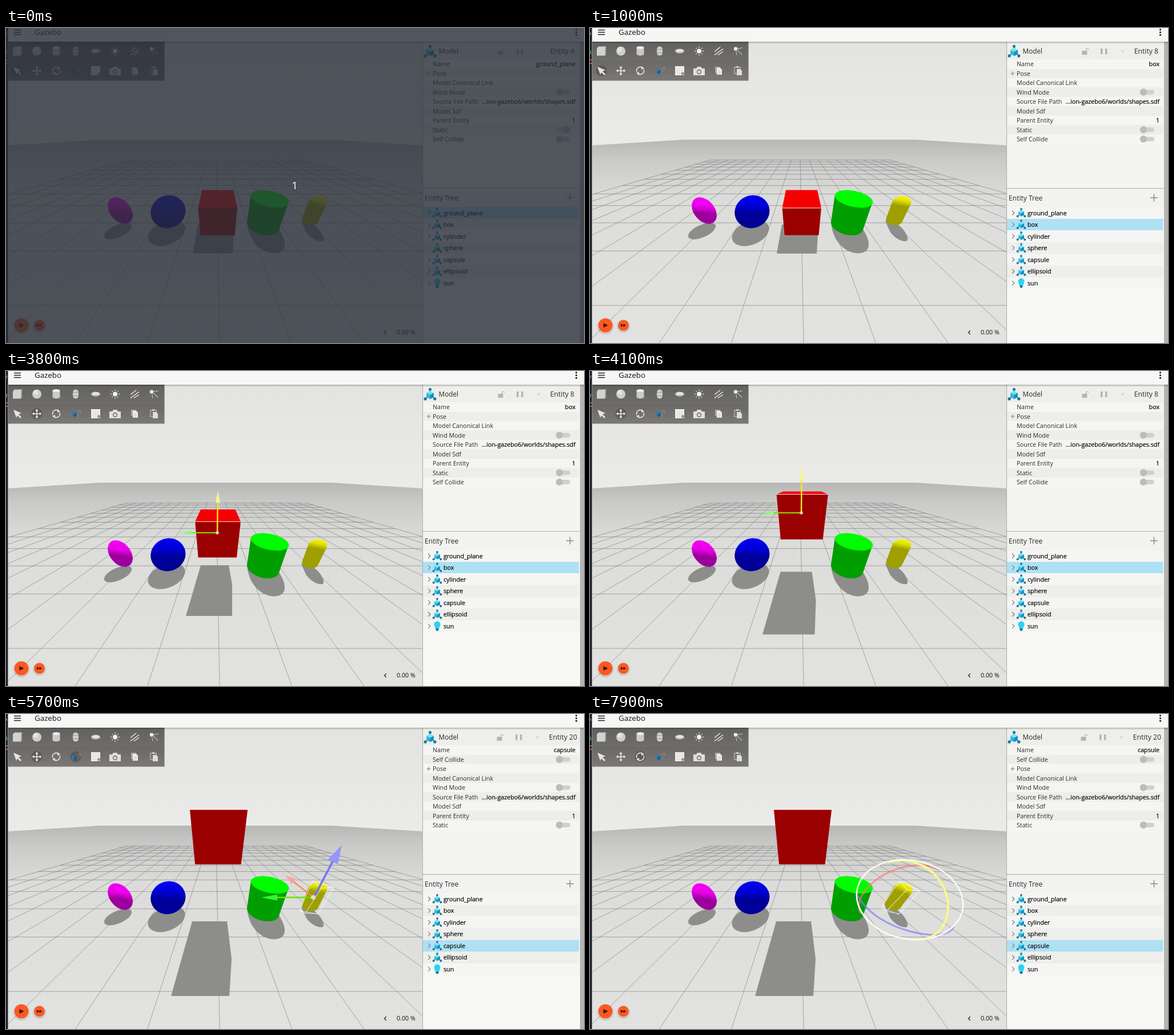
An HTML page for the animation above (8000 ms loop, 1012 by 553 pixels).

```html
<!DOCTYPE html>
<html lang="en">
<head>
<meta charset="utf-8">
<title>Simulation scene</title>
<style>
html, body { margin: 0; width: 100%; height: 100%; overflow: hidden; background: #f7f7f6; }
svg { display: block; width: 1012px; height: 553px; font-family: "Open Sans", "Noto Sans", sans-serif; }
text { fill: #111; white-space: pre; }
.label { fill: #2b2b2b; }
.value { fill: #000; stroke: #000; stroke-width: .2px; }
.shadow { fill: #8d8d8b; }
.line { fill: none; stroke-linecap: round; stroke-linejoin: round; }
</style>
</head>
<body>
<svg id="stage" viewBox="0 0 1012 553">
  <defs>
    <linearGradient id="sky" x2="0" y2="1"><stop stop-color="#e3e3e2"/><stop offset="1" stop-color="#ebebea"/></linearGradient>
    <linearGradient id="ground" gradientUnits="userSpaceOnUse" x1="0" y1="196" x2="0" y2="553">
      <stop stop-color="#b7b7b6"/><stop offset=".1" stop-color="#cacac9"/><stop offset=".28" stop-color="#dcdcda"/><stop offset="1" stop-color="#e2e2e0"/>
    </linearGradient>
    <linearGradient id="drop" x2="0" y2="1"><stop stop-opacity=".25"/><stop offset="1" stop-opacity="0"/></linearGradient>
    <linearGradient id="bar" x2="0" y2="1"><stop stop-color="#626160"/><stop offset=".48" stop-color="#6f6d6b"/><stop offset=".5" stop-color="#6b6967"/><stop offset="1" stop-color="#7b7876"/></linearGradient>
    <linearGradient id="magenta" gradientUnits="userSpaceOnUse" x1="203" y1="297" x2="197" y2="344" gradientTransform="rotate(-50 200 320.5)"><stop stop-color="#f600f6"/><stop offset=".36" stop-color="#e800e8"/><stop offset=".6" stop-color="#9c009c"/></linearGradient>
    <linearGradient id="blue" gradientUnits="userSpaceOnUse" x1="284" y1="294" x2="284" y2="351" gradientTransform="rotate(22 283.800 322.500)"><stop stop-color="#0000f2"/><stop offset=".28" stop-color="#0000dc"/><stop offset=".58" stop-color="#000098"/></linearGradient>
    <linearGradient id="yellow" gradientUnits="userSpaceOnUse" x1="545" y1="295" x2="541" y2="316"><stop stop-color="#f6f600"/><stop offset=".35" stop-color="#e2e200"/><stop offset=".8" stop-color="#9f9f00"/></linearGradient>
    <clipPath id="view"><path d="M4 24H729V553H4Z"/></clipPath>
    <clipPath id="props"><path d="M729 24H1005V281H729Z"/></clipPath>
    <g id="cube">
      <path fill="#28b9e2" d="M0-6 5.2-3V3L0 6-5.2 3V-3Z"/>
      <path fill="#7fe0f5" d="M0-6 5.2-3 0 0-5.2-3Z"/>
      <path fill="#1590bb" d="M0 0 5.2-3V3L0 6Z"/>
    </g>
    <g id="model">
      <path stroke="#37718c" stroke-width="1.2" d="M0-7V0M0 0-6.5 6M0 0 6.5 6"/>
      <use href="#cube" transform="translate(0 .8) scale(.92)"/>
      <g fill="#1679a3"><circle cy="-6.6" r="1.9"/><circle cx="-6.3" cy="6" r="2"/><circle cx="6.3" cy="6" r="2"/></g>
    </g>
  </defs>

  <g clip-path="url(#view)">
    <path fill="url(#sky)" d="M4 24H729V207H4Z"/>
    <path fill="url(#ground)" d="M4 206 165 196H570L729 206V553H4Z"/>
    <path id="grid" class="line" stroke="#777776" stroke-width=".7" opacity=".85"/>

    <ellipse class="shadow" cx="196" cy="356.5" rx="26" ry="11" transform="rotate(-24 196 356.5)"/>
    <ellipse class="shadow" cx="281" cy="360" rx="34" ry="20.5" transform="rotate(-22 281 360)"/>
    <path class="shadow" d="M422 338C423 362 432 378 448 389 462 398 486 399 488 382 489 370 481 358 470 340Z"/>
    <path class="shadow" d="M517 339C522 335 536 341 546 351 555 361 559 372 554 374 545 376 531 367 525 357Z"/>
    <path id="boxShadow" class="shadow"/>

    <ellipse cx="200" cy="320.5" rx="26.5" ry="18" fill="url(#magenta)" transform="rotate(50 200 320.5)"/>
    <ellipse cx="283.8" cy="322.5" rx="30.9" ry="28.6" fill="url(#blue)" transform="rotate(-22 283.8 322.5)"/>
    <path id="boxTop" fill="#f40000"/>
    <path id="boxFront" fill="#9b0000"/>
    <g id="boxWire" class="line" stroke="#fff"><path id="wireEdge" opacity=".8"/><path id="wireSides" opacity=".18"/></g>
    <path fill="#009e00" d="M429 292 422 340C421 352 440 364 458 364 470 364 476 360 478 354L495 305Z"/>
    <ellipse cx="462" cy="300" rx="34" ry="14" fill="#00fb00" transform="rotate(12 462 300)"/>
    <g id="capsule">
      <path fill="url(#yellow)" d="M530 303C534 295 552 293 559 299 563 302 563 306 561 311L546 341C543 347 534 347 527 345 519 342 517 338 519 333Z"/>
      <path id="capWire" class="line" stroke="#fff" opacity=".75" d="M514 345 537 293 574 304 546 351Z M524 350 552 306 537 293M552 306 574 304M524 350 514 345M524 350H546"/>
    </g>

    <g id="boxGizmo">
      <path id="axisY" class="line" stroke="#86e000" stroke-width="2"/>
      <path id="coneY"/>
      <path id="axisZ" class="line" stroke-width="2.5"/>
      <path id="coneZ"/>
      <circle id="boxDot" cx="370" r="2.8" fill="#d9d0d0"/>
    </g>

    <g id="capGizmo">
      <path class="line" stroke="#f08a60" stroke-width="2.4" d="M538 322 503 294"/>
      <path fill="#ff9c9c" fill-opacity=".85" d="M489 283 507 289 500 299Z"/>
      <path class="line" stroke="#5fe800" stroke-width="2.6" d="M538 322H474"/>
      <path fill="#38ff38" fill-opacity=".9" d="M447 322 475 317V327.5Z"/>
      <path class="line" stroke="#7474ff" stroke-width="3.6" d="M540 320 572 259"/>
      <path fill="#8f8fff" fill-opacity=".9" d="M588 230 581 263 564 255Z"/>
      <circle cx="538" cy="322" r="4" fill="#dcdccf"/>
    </g>

    <g id="rings" class="line">
      <g id="turning" stroke-width="3">
        <path stroke="#ff7777" stroke-opacity=".68" d="M473 349C464 327 484 300 515 282 547 264 594 258 621 279"/>
        <path stroke="#7c7cff" stroke-opacity=".68" d="M469 319C482 345 516 370 562 382 598 391 629 390 637 373"/>
      </g>
      <path id="ringY" stroke-width="4" d="M524 260C552 251 588 262 608 287 627 310 632 340 622 364 613 386 594 397 568 396"/>
      <ellipse cx="560" cy="326" rx="94" ry="69" stroke="#fafafa" stroke-width="2.6" transform="rotate(11 560 326)"/>
    </g>

    <path fill="url(#bar)" d="M4 24H277.5V92.5H4Z"/>
    <g id="tools"></g>
    <g opacity=".1"><circle cx="27" cy="523.5" r="14.5"/><circle cx="27" cy="523" r="13.3"/><circle cx="58.5" cy="523.5" r="11.5"/><circle cx="58.5" cy="523" r="10.4"/></g>
    <g fill="#ff571f"><circle cx="27" cy="522" r="12.3"/><circle cx="58.5" cy="522" r="9.4"/></g>
    <path fill="#2c1a12" d="M23.5 518 31.5 522 23.5 526ZM54 519.3 58.5 522 54 524.7ZM58.5 519.3 63 522 58.5 524.7Z"/>
    <path class="line" stroke="#222" stroke-width="1.3" d="M665.5 531.5 662.5 534.5 665.5 537.5"/>
    <text x="684" y="538" font-size="10.7">0.00 %</text>
  </g>

  <path fill="#f8f8f7" d="M729 24H1005V553H729Z"/>
  <g id="panel" clip-path="url(#props)"></g>
  <path stroke="#aaa" d="M729.5 24V553M730 281.5H1005"/>
  <path fill="#f2f2f0" d="M730 282H1005V314H730Z"/>
  <text x="733" y="302.5" font-size="12.1" class="label">Entity Tree</text>
  <path stroke="#8a8a8a" stroke-width="1.5" d="M981 298H994M987.5 291.5V304.5"/>
  <g id="tree"></g>

  <path fill="#b4b4b3" d="M1005 24H1012V553H1005Z"/>
  <path fill="#f6f6f5" d="M4 0H1012V24H4Z"/>
  <path fill="url(#drop)" d="M4 24H1012V28H4Z"/>
  <path fill="#1d222b" d="M0 0H3.5V553H0Z"/>
  <path fill="#4f7c72" d="M0 8H2V12H0ZM0 40H2V46H0Z"/><path fill="#b4623f" d="M0 55H3V57H0ZM0 61H3V63H0Z"/>
  <path stroke="#222" stroke-width="1.6" d="M14 3.5H26M14 7.5H26M14 11.5H26"/>
  <text x="50" y="11.8" font-size="13.3">Gazebo</text>
  <g fill="#222"><circle cx="998.5" cy="2.8" r="1.6"/><circle cx="998.5" cy="7.5" r="1.6"/><circle cx="998.5" cy="12.2" r="1.6"/></g>

  <g id="dim">
    <path fill="rgb(40,46,55)" fill-opacity=".8" d="M0 0H1012V553H0Z"/>
    <text x="505.5" y="283" font-size="18.5" text-anchor="middle" style="fill:#fff">1</text>
  </g>
</svg>
<script>
const $ = id => document.getElementById(id);
const draw = (id, d) => $(id).setAttribute("d", d);
const show = (id, on) => { $(id).style.display = on ? "" : "none"; };
const LOOP = 8000;

// Ground grid in perspective: depth is measured as offset below the horizon.
function gridPath() {
  const HORIZON = 186, CELL = .3445;
  const offset = n => 1 / (.003322 + .001544 * n);
  const x = (col, off) => 367.2 + (.0187 + CELL * col) * off;
  let d = "";
  for (let n = 0; n <= 12; n++) {
    const o = offset(n);
    d += `M${x(-10, o)} ${HORIZON + o}L${x(10, o)} ${HORIZON + o}`;
  }
  for (let c = -10; c <= 10; c++) {
    const far = offset(12);
    d += `M${x(c, far)} ${HORIZON + far}L${x(c, 380)} ${HORIZON + 380}`;
  }
  return d;
}

const icons = [
  [20, 40.5, '<path fill="#d2d2d1" d="M-8-5-5-8H8V5L6 8H-8Z"/><path fill="#a9a9a8" d="M6-5 8-8V5L6 8Z"/>'],
  [54, 40.5, '<circle r="8" fill="#cfcfce"/><circle cx="-2" cy="-3" r="4" fill="#e4e4e3"/>'],
  [88, 40.5, '<path fill="#cacac9" d="M-6.5-6V6Q0 10 6.5 6V-6Z"/><ellipse cy="-6" rx="6.5" ry="2.5" fill="#eee"/>'],
  [122, 40.5, '<rect x="-5" y="-8" width="10" height="16" rx="5" fill="#cfcfce"/><path stroke="#999" d="M-5-3H5M-5 3H5"/>'],
  [157, 40.5, '<ellipse rx="8" ry="4" fill="#c9c9c8"/><ellipse cy="-1" rx="6" ry="2" fill="#e8e8e7"/>'],
  [191, 40.5, '<circle r="4" fill="#f4f4f3"/><path stroke="#eee" stroke-width="1.4" d="M0-8V-6M0 6V8M-8 0H-6M6 0H8M-5.5-5.5-4.3-4.3M4.3 4.3 5.5 5.5M-5.5 5.5-4.3 4.3M4.3-4.3 5.5-5.5"/>'],
  [225, 40.5, '<path stroke="#eee" stroke-width="1.4" d="M-7 1 3-7M-7 7 8-4M-1 7 8 1"/>'],
  [259, 40.5, '<circle cx="-4" cy="-4" r="3.2" fill="#eee"/><path stroke="#ddd" stroke-width="1.5" stroke-dasharray="2 1.5" d="M0-4 8-6M0-1 7 6M-3 1-2 7"/>'],
  [20, 75, '<path fill="#e6e6e5" d="M-7-7 7-1 2 1 7 6 5 8 0 3-2 7Z"/>'],
  [54, 75, '<path fill="none" stroke="#e6e6e5" stroke-width="1.7" d="M-7 0H7M0-7V7M-5-2-7 0-5 2M5-2 7 0 5 2M-2-5 0-7 2-5M-2 5 0 7 2 5"/>'],
  [88, 75, '<path fill="none" stroke="#e6e6e5" stroke-width="1.6" d="M-6 2A6.3 6.3 0 0 1 4-5M6-2A6.3 6.3 0 0 1-4 5"/><path fill="#e6e6e5" d="M2-8 7-4 2-2ZM-2 8-7 4-2 2Z"/>'],
  [122, 75, '<path fill="#2f78ad" d="M-7-1-3-3 1-1V4L-3 6-7 4Z"/><path fill="#1c5582" d="M-3 1 1-1V4L-3 6Z"/><path fill="none" stroke="#8f9aa3" d="M3-3 8-6V-1M3 3 6 0"/>'],
  [157, 75, '<path fill="#f4f4f3" d="M-8-8H8V8H-8Z"/><path stroke="#d4d4d3" stroke-width=".8" d="M-8-4H8M-8 0H8M-8 4H8M-4-8V8M0-8V8M4-8V8"/><circle cx="5.500" cy="5" r="2.800" fill="#999"/>'],
  [191, 75, '<path fill="#e0e0df" d="M-10-4H-5L-3-7H3L5-4H10V8H-10Z"/><circle cy="2" r="4.2" fill="#777"/><circle cy="2" r="2.6" fill="#ddd"/>'],
  [225, 75, '<path fill="#aaa" d="M-6-7H3V4H-6Z"/><path fill="#eee" d="M-3-5H3L6-2V7H-3Z"/><path stroke="#bbb" stroke-width=".8" d="M-1 0H4M-1 2.5H4M-1 5H4"/>'],
  [259, 75, '<path fill="none" stroke="#bbb" stroke-width="1.3" d="M-6-6H4V5H-6Z"/><path fill="#ccc" d="M-3-8H1V-5H-3Z"/><path fill="#ddd" d="M-2-3H4L7 0V8H-2Z"/>']
];
const toolX = { select: 20, move: 54, rotate: 88, snap: 122 };
$("tools").innerHTML =
  Object.entries(toolX).map(([k, x]) => `<circle id="hot-${k}" cx="${x}" cy="75" r="9.5" fill="#4b4846" opacity=".55"/>`).join("") +
  icons.map(([x, y, art]) => `<g transform="translate(${x} ${y})">${art}</g>`).join("");

// Property rows: [label, value, expandable]
const file = ["Source File Path", "…ion-gazebo6/worlds/shapes.sdf"];
const canonical = ["Model Canonical Link"], sdf = ["Model Sdf"], pose = ["Pose", "", 1];
const wind = ["Wind Mode", "off"], collide = ["Self Collide", "off"];
const body = (name, fixed) => [["Name", name], pose, canonical, wind, file, sdf, ["Parent Entity", "1"], ["Static", fixed], collide];
const views = {
  plane: { title: "Model", id: 4, rows: body("ground_plane", "on"), pick: 0 },
  box: { title: "Model", id: 8, rows: body("box", "off"), pick: 1 },
  world: {
    title: "World", id: 1, pick: -1,
    rows: [["Name", "shapes"], ["Gravity", "", 1], ["Atmosphere"], ["Render Engine Server Headless"],
      ["Physics Collision Detector", "ode"], ["System Plugin Info", "", 1], ["Physics", "", 1], ["Magnetic Field", "", 1],
      ["Render Engine Gui Plugin"], ["Physics Solver", "DantzigBoxedLcpSolver"], ["Render Engine Server Plugin"],
      ["Scene"], ["Physics Engine Plugin"], ["World Sdf"]]
  },
  capsule: {
    title: "Model", id: 20, pick: 4,
    rows: [["Name", "capsule"], collide, pose, canonical, wind, file, sdf, ["Parent Entity", "1"], ["Static", "off"]]
  }
};

const text = (x, y, s, size = 10.7, extra = "") => `<text x="${x}" y="${y}" font-size="${size}" ${extra}>${s}</text>`;
const END = 'text-anchor="end"', LABEL = 'class="label"', VALUE = 'class="value"';
const strip = (top, h, fill) => `<path fill="${fill}" d="M730 ${Math.round(top)}H1003.5V${Math.round(top + h)}H730Z"/>`;
const toggle = (y, on) => `<rect x="963" y="${y - 4}" width="25" height="8" rx="4" fill="#d0d0cf"/><circle cx="${on ? 981.5 : 969}" cy="${y}" r="6.2" fill="#bcbcbb"/>`;

function rowMarkup([name, value, open], i) {
  const y = 63.3 + i * 16.46;
  let out = strip(y - 8.2, 16.46, i % 2 ? "#edede9" : "#f5f5f2") + text(747, y + 4, name, 10.7, LABEL);
  if (open) out += `<path stroke="#888" stroke-width="1.2" d="M736.5 ${y}h7M740 ${y - 3.5}v7"/>`;
  if (value === "on" || value === "off") out += toggle(y, value === "on");
  else if (value) out += text(997, y + 4, value, 10.7, `${END} ${VALUE}`);
  return out;
}

function panelMarkup({ title, id, rows }) {
  const wide = id > 9;
  const icon = title === "World" ? '<use href="#cube" transform="translate(742.5 41.5) scale(1.55)"/>'
    : '<use href="#model" transform="translate(742.5 41) scale(1.32)"/>';
  return '<path fill="#f4f4f1" d="M730 24H1005V281H730Z"/>' + strip(24, 31, "#eeeeea") + icon +
    text(757.5, 45, title, 11.8, LABEL) +
    `<g transform="translate(${wide ? -2 : 0})" fill="#b5b5b4"><path d="M861.5 40h9v7h-9Z"/><path fill="none" stroke="#b5b5b4" stroke-width="1.3" d="M868.5 40v-2a2.3 2.3 0 0 1 4.5 0"/><path d="M894 36h3.5v10h-3.5ZM902 36h3.5v10h-3.5Z"/><path stroke="#c4c4c3" d="M930 41h5M932.5 38.5v5"/></g>` +
    text(wide ? 1000 : 995, 45, "Entity " + id, 12.2, `${END} ${LABEL}`) + rows.map(rowMarkup).join("");
}

const entities = ["ground_plane", "box", "cylinder", "sphere", "capsule", "ellipsoid", "sun"];
const bulb = '<path fill="#2bd3f3" d="M-3.5 4C-3.5 2-5.5 0-5.5-3A5.5 5.5 0 0 1 5.5-3C5.5 0 3.5 2 3.5 4Z"/><path fill="#1679a3" d="M-2.5 4H2.5V7L0 9-2.5 7Z"/>';
const treeMarkup = pick => entities.map((name, i) => {
  const y = 324.5 + i * 20.55;
  const fill = i === pick ? "#aee1f4" : i % 2 ? "#eeeeeb" : "#f5f5f3";
  return strip(y - 10.2, 20.55, fill) +
    `<path class="line" stroke="#777" stroke-width="1.2" d="M739.5 ${y - 3.5}l3.5 3.5-3.5 3.5"/>` +
    `<g transform="translate(755 ${y})">${name === "sun" ? bulb : '<use href="#model"/>'}</g>` +
    text(766, y + 4, name, 10.7, VALUE);
}).join("");

// Box poses: low, partly lifted, fully lifted.
const lifts = [
  { front: [336.5, 316, 405, 316, 400.5, 364, 340.5, 364], back: [343, 284.5, 398, 284.5], cast: [336, 345, 399, 345, 399, 362, 397, 396, 327, 396], axis: [322, 259, 302] },
  { front: [331, 264.5, 411, 264.5, 404, 327.5, 336.5, 327.5], back: [341, 243, 401.5, 243], cast: [341, 341, 390, 341, 396, 375, 396, 430, 315, 430], axis: [284, 212, 304] },
  { front: [322, 168.5, 423, 168.5, 411.5, 264, 331, 264], back: [336, 180, 408, 180], cast: [326, 364, 387, 364, 395, 430, 391, 495, 289, 495], axis: [214, 124, 300] }
];
const clamp = v => Math.min(1, Math.max(0, v));
const poly = pts => "M" + pts.join(" ") + "Z";

function drawBox(t) {
  const u = clamp((t - 3500) / 300) + clamp((t - 3800) / 600);
  const i = Math.min(1, Math.floor(u)), k = u - i;
  const mix = key => lifts[i][key].map((v, n) => v + (lifts[i + 1][key][n] - v) * k);
  const front = mix("front"), back = mix("back"), [oy, tip, gx] = mix("axis");
  draw("boxFront", poly(front));
  draw("boxTop", poly([...back, front[2], front[3], front[0], front[1]]));
  draw("boxShadow", poly(mix("cast")));
  draw("wireEdge", "M" + front.slice(0, 4).join(" "));
  draw("wireSides", poly(front));

  const held = t >= 3200, len = (oy - tip) * .3;
  draw("axisZ", `M370 ${oy}L370.5 ${tip + len}`);
  draw("coneZ", `M371 ${tip - 2}l4 ${len}h-8Z`);
  draw("axisY", `M370 ${oy}H${gx + 15}`);
  draw("coneY", `M${gx} ${oy}l${held ? 20 : 14} -3.5v7Z`);
  $("axisZ").setAttribute("stroke", held ? "#ffe61a" : "#a32be0");
  $("coneZ").setAttribute("fill", held ? "#f7f58e" : "#9090f8");
  $("coneY").setAttribute("fill", held ? "#8cfb80" : "#35e860");
  $("boxDot").setAttribute("cy", oy);
}

function drawCapsule(t) {
  const k = clamp((t - 7400) / 500);
  $("capsule").setAttribute("transform", `rotate(${11 * k} 540 321)`);
  $("turning").setAttribute("transform", `rotate(${7 * (k - 1)} 560 326)`);
  $("ringY").setAttribute("stroke", t >= 7400 ? "#f8f68d" : "#8df58d");
}

const within = (t, a, b) => t >= a && t < b;
let current;
function render(now) {
  const t = Math.floor(now % LOOP / 100) * 100;
  const key = t < 700 ? "plane" : t < 4500 ? "box" : t < 5100 ? "world" : "capsule";
  if (key !== current) {
    current = key;
    $("panel").innerHTML = panelMarkup(views[key]);
    $("tree").innerHTML = treeMarkup(views[key].pick);
  }
  drawBox(t);
  drawCapsule(t);
  show("dim", t < 100);
  show("boxWire", key === "box");
  show("boxGizmo", within(t, 2300, 4500));
  show("capWire", t >= 5100);
  show("capGizmo", within(t, 5200, 5900));
  show("rings", t >= 5900);
  show("hot-select", t < 1300);
  show("hot-move", within(t, 1300, 5900));
  show("hot-rotate", within(t, 1300, 3600) || t >= 5800);
  show("hot-snap", t === 5700);
  requestAnimationFrame(() => render(performance.now()));
}
draw("grid", gridPath());
render(performance.now());
</script>
</body>
</html>
```
